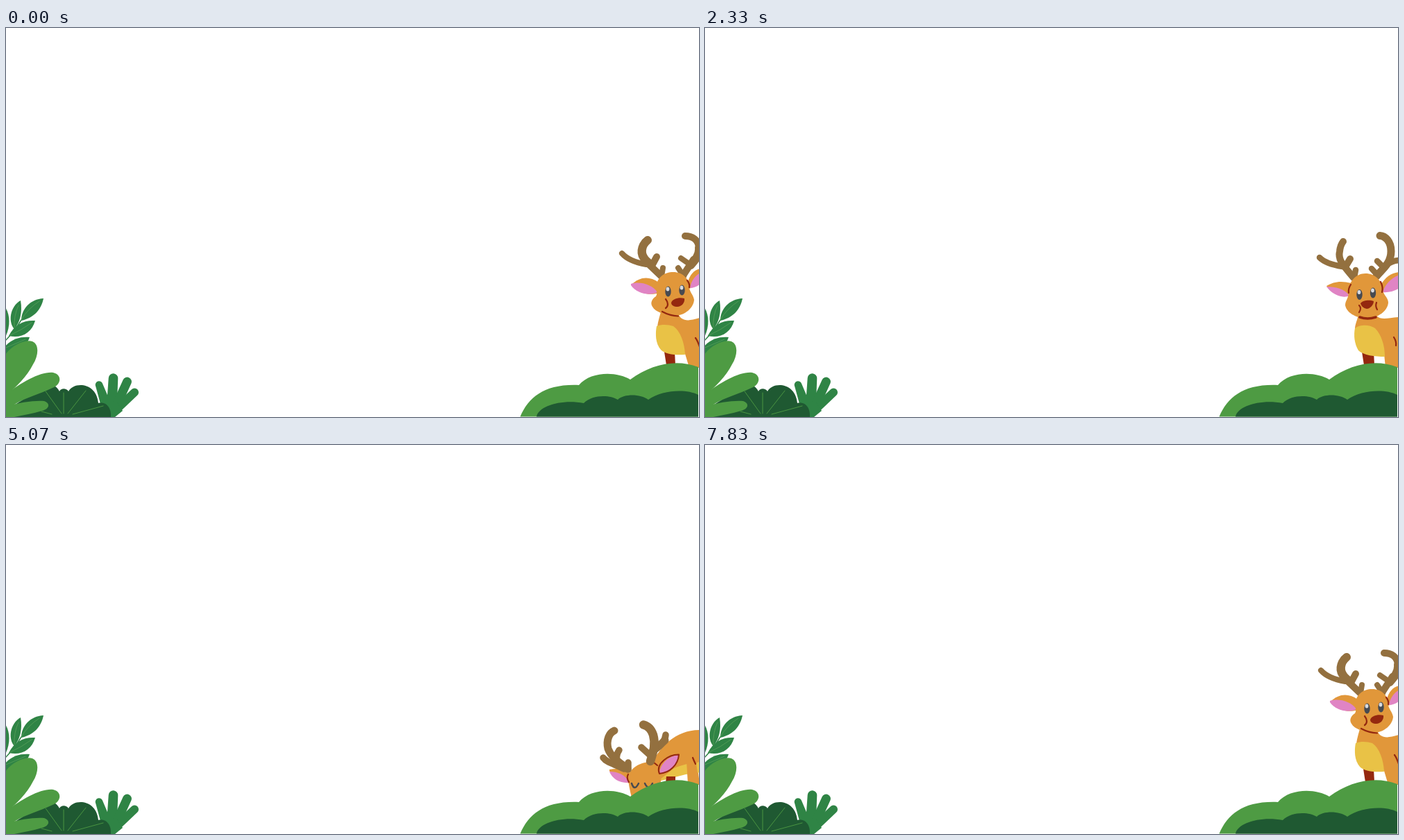
These frames come from a looping animation (998x561 px, 7.91 s). An HTML page with a canvas:

```html
<!DOCTYPE html>
<html lang="en">
<head>
<meta charset="utf-8">
<title>Deer in the bushes</title>
<style>
html, body { margin: 0; width: 100%; height: 100%; overflow: hidden; background: #fff; }
canvas { display: block; width: 998px; height: 561px; }
</style>
</head>
<body>
<canvas id="stage" width="998" height="561"></canvas>
<script>
const ctx = document.getElementById('stage').getContext('2d');
const LIGHT = '#4e9b43', MID = '#2f8445', DARK = '#1f5932';
const ORANGE = '#e1973a', YELLOW = '#e9c246', BROWN = '#93703f';
const PINK = '#e084c4', RED = '#94280f', EYE = '#474a50';

function fill(color, d) {
  ctx.fillStyle = color;
  ctx.fill(new Path2D(d));
}
function line(color, width, ...paths) {
  ctx.strokeStyle = color;
  ctx.lineWidth = width;
  ctx.lineCap = ctx.lineJoin = 'round';
  for (const d of paths) ctx.stroke(new Path2D(d));
}
function oval(color, x, y, rx, ry = rx) {
  ctx.fillStyle = color;
  ctx.beginPath();
  ctx.ellipse(x, y, rx, ry, 0, 0, Math.PI * 2);
  ctx.fill();
}
// Rounded tip tapering towards its base
function finger(x, y, r, bx, by, br) {
  const a = Math.atan2(y - by, x - bx), q = Math.PI / 2;
  ctx.fillStyle = MID;
  ctx.beginPath();
  ctx.arc(x, y, r, a - q, a + q);
  ctx.arc(bx, by, br, a + q, a - q + Math.PI * 2);
  ctx.fill();
}
function eye(x, y) {
  oval(EYE, x, y, 4.2, 7.6);
  oval('#d9dade', x - 0.5, y - 3.5, 2.4, 3);
}

function leftPlants() {
  line(MID, 1.5, 'M-2 452Q12 438 22 421');
  fill(MID, 'M22 422C22 405 35 391 54 390C51 405 41 418 22 422Z');
  fill(MID, 'M12 434C3 425 5 402 21 393C24 410 20 425 12 434Z');
  fill(MID, 'M4 444C12 428 25 421 42 422C37 440 22 448 4 444Z');
  fill(MID, 'M-4 462C8 448 20 445 34 446C30 460 15 466 -2 464Z');
  fill(MID, 'M-3 450V400C6 411 8 430 -3 450Z');
  fill(MID, 'M0 464H14V470L0 480Z');
  line('#58a05a', 0.8, 'M22 421Q31 405 48 394', 'M12 432Q11 415 18 400',
    'M6 443Q22 436 37 425', 'M0 461Q14 455 28 449');

  finger(134, 514.5, 5.3, 147, 552, 8);
  finger(154.5, 505, 6.8, 152, 552, 7.5);
  finger(174.5, 510, 6.4, 155, 553, 6.5);
  finger(185, 525.5, 6, 154, 555, 6);
  fill(MID, 'M136 540H160L168 552L157 561H136Z');

  fill(DARK, 'M10 561V545L40 526L68 515C72 517 75 520 77 524C79 519 87 519 90 524' +
    'C97 510 130 510 133 541C146 538 152 550 151 561Z');
  line(LIGHT, 0.9, 'M80 556L57 524', 'M83 556V526', 'M89 556L115 523', 'M96 557L140 545', 'M66 557L51 553');

  fill(LIGHT, 'M-1 471C9 457 28 449 38 452C48 456 47 472 39 485C30 503 14 519 -1 530Z');
  fill(LIGHT, 'M-1 529C22 511 50 495 68 497C81 500 80 514 67 519C48 528 28 533 12 543L-1 552Z');
  fill(LIGHT, 'M-1 546C20 540 40 537 55 538C64 541 63 549 52 552C39 556 25 558 12 561H-1Z');
}

function rightBush() {
  fill(LIGHT, 'M740.5 560.5C753 532 776 513 825 515C842 495 879 495 899 507C930 484 966 477 997 489V560.5Z');
  fill(DARK, 'M764 560.5C767 545 800 535 832 541C845 528 870 529 881 536C891 527 914 528 925 536C945 522 979 520 997 529V560.5Z');
}

function standing(neck, chest, leg, mark) {
  fill(RED, leg);
  fill(ORANGE, neck);
  fill(YELLOW, chest);
  line(RED, 2.2, mark);
}

const bodies = {
  right() {
    standing('M944 406L968 412C972 422 981 424 999 418V490H984L978 470L938 434C938 426 941 417 944 406Z',
      'M937 430C945 427 954 428 961 430C971 437 977 453 978 471C965 472 950 471 943 464C935 455 935 440 937 430Z',
      'M948 467H963L964 486H951Z', 'M993 447Q996 451 999 460');
  },
  middle() {
    standing('M941 413L967 415C974 422 984 418 999 417V490H980L978 470L936 434C936 427 940 420 941 413Z',
      'M936 433C944 427 957 428 965 433C974 442 979 458 979 474C965 474 948 472 941 465C935 455 934 443 936 433Z',
      'M946 467H963L964 486H949Z', 'M992 446Q996 452 995 458');
  },
  left() {
    standing('M939 418L962 412C970 422 985 417 999 414V490H980L977 470L936 435C937 429 939 424 939 418Z',
      'M937 434C943 429 954 430 962 436C971 446 977 460 978 474C964 474 949 473 941 466C935 457 935 443 937 434Z',
      'M946 468H962L963 486H948Z', 'M991 447Q992 455 994 459');
  },
  grazing() {
    fill(YELLOW, 'M935 470L999 455V472L979 475L940 485Z');
    fill(RED, 'M951 478H964V488H950Z');
    fill(ORANGE, 'M925 470C940 434 965 411 999 411V457C985 459 973 461 962 466L935 488Z');
    fill(ORANGE, 'M980 455H995L999 490H982Z');
    fill(YELLOW, 'M994 459L999 457V472L996 473Z');
    line(RED, 2.2, 'M989 451Q991 456 993 460');
  }
};

const heads = {
  right() {
    line(BROWN, 8, 'M887 325C894 333 905 338 922 341', 'M972 332L985 341', 'M968 346L976 358', 'M946 346L944 358');
    line(BROWN, 10, 'M937 330L930 343', 'M945 359L925 340', 'M975 357L990 334');
    line(BROWN, 12, 'M929 341C918 334 912 325 918 313Q921 308 924 306', 'M986 342C993 334 999 327 998 317');
    line(BROWN, 10, 'M998 317C997 305 988 300 978 300');
    fill(ORANGE, 'M940 367C926 357 912 359 901 370C910 384 930 386 940 382Z');
    fill(PINK, 'M900 369C912 365 930 369 938 381C928 387 908 383 900 371Z');
    fill(ORANGE, 'M982 366C985 355 992 348 1000 347V368L984 376Z');
    fill(PINK, 'M1000 353C992 357 986 366 985 375Q993 375 1000 369Z');
    fill(ORANGE, 'M937 375C936 360 948 352 961 352C974 352 984 361 984 374C984 380 990 385 991 392C990 404 978 414 964 415C950 414 935 410 931 402C927 396 931 390 936 387C938 384 937 380 937 375Z');
    line(RED, 2.2, 'M981 364Q985 369 984 374', 'M950 391C954 396 954 401 950 404', 'M945 409Q956 415 968 415.5');
    eye(953.5, 380);
    eye(973.5, 378);
    fill(RED, 'M958 396C960 390 970 388 977 390C978 397 972 402 967 402C962 402 958 400 958 396Z');
  },
  middle() {
    line(BROWN, 8.5, 'M885 331C892 338 905 342 918 344', 'M982 341Q991 335 1001 335', 'M968 336L978 346', 'M960 347L969 357', 'M937 349L935 360');
    line(BROWN, 10, 'M929 333L923 343', 'M934 360C920 343 911 335 914 322Q915 313 919 308');
    line(BROWN, 11, 'M967 358C975 348 988 340 988 322C988 308 980 300 972 299.5');
    fill(ORANGE, 'M931 368C915 364 905 366 895 372C905 385 918 389 928 386Z');
    fill(PINK, 'M895 373C908 373 921 376 928 386C918 391 903 384 895 373Z');
    fill(ORANGE, 'M973 371C980 358 990 353 1000 352V374L975 382Z');
    fill(PINK, 'M976 381C980 368 990 360 1000 356V375Q989 382 976 381Z');
    fill(ORANGE, 'M927 380C927 365 938 354 951 354C965 354 975 364 976 378C977 385 984 389 984 396C983 408 970 418 953 419C936 418 924 410 922 400C922 393 927 390 927 380Z');
    line(RED, 2.2, 'M930 370Q926 376 927 382', 'M973 366Q977 374 975 381', 'M942 400Q946 404 942 410', 'M967 396Q965 401 968 406');
    line(RED, 3.5, 'M943 417Q954 421 966 417');
    eye(942.5, 384.5);
    eye(962, 382);
    fill(RED, 'M944 397C948 392 958 392 963 394C963 400 957 405 953 405C948 404 945 401 944 397Z');
  },
  left() {
    line(BROWN, 9, 'M882 336C889 344 898 347 912 347', 'M974 345C984 343 993 338 1001 336', 'M918 336L912 347');
    line(BROWN, 7.5, 'M958 339L968 347', 'M953 353L961 361', 'M930 351L929 363');
    line(BROWN, 9, 'M929 364C912 351 902 341 906 322Q908 314 912 310');
    line(BROWN, 10, 'M957 365C968 352 982 345 980 325C979 312 973 305 966 303');
    fill(ORANGE, 'M925 374C910 369 900 371 891 377C902 391 914 392 921 389Z');
    fill(PINK, 'M891 377C903 377 915 380 921 388C912 394 898 388 891 377Z');
    fill(ORANGE, 'M964 370C974 358 985 357 994 360C990 375 978 382 967 384Z');
    fill(PINK, 'M968 384C972 372 982 364 995 361C990 374 980 383 968 384Z');
    fill(ORANGE, 'M919 385C919 370 930 360 942 360C955 360 966 368 968 382C969 388 975 392 976 400C975 413 960 422 943 423C927 421 916 413 915 404C916 396 919 394 919 385Z');
    line(RED, 2.2, 'M922 375Q919 381 920 386', 'M932 406Q934 410 931 415', 'M957 399C954 404 956 409 959 411', 'M942 422Q953 421 961 416');
    eye(932.5, 389);
    eye(953.5, 386);
    fill(RED, 'M932 401C937 396 945 396 951 399C950 405 944 410 941 410C936 408 934 405 932 401Z');
  },
  grazing() {
    fill(ORANGE, 'M869 468C880 466 890 467 899 473V488C885 486 875 480 869 470Z');
    fill(PINK, 'M869 471C880 471 893 475 897 487C885 488 873 482 869 471Z');
    fill(ORANGE, 'M896 478C900 464 915 457 930 457C942 460 945 472 943 485L940 512C939 530 905 530 902 512Q896 490 896 478Z');
    line(RED, 2.2, 'M896 475Q893 480 897 486', 'M933 458L938 462');
    line(EYE, 2.5, 'M901 488Q905 500 911 488', 'M920 488Q925 499 931 488');
    fill(RED, 'M909 511Q917 506 925 511Q922 520 917 520Q911 518 909 511Z');
    fill(PINK, 'M941 474C942 459 955 448 969 447C967 461 956 473 941 474Z');
    line(RED, 2, 'M941 474C935 459 955 446 969 446.5C968 461 956 473 941 474Z');
    line(BROWN, 9.5, 'M860 451C865 458 876 460 890 467', 'M883 440Q878 447 880 457', 'M896 458L896 468', 'M950 418Q949 430 934 440', 'M915 436L926 446');
    line(BROWN, 11, 'M895 467C887 460 872 452 867 438C864 425 869 415 876 412', 'M949 426L931 442');
    line(BROWN, 12.5, 'M928 456C932 443 936 432 932 418Q928 406 918 403.5');
  }
};

// start time, pose, head shift x, y, head tilt in degrees
const steps = [
  [0, 'right', 0, 0, 0],
  [130, 'middle', 0, 0, 0],
  [230, 'left', 0, 0, 0],
  [330, 'left', -2, 5, -1],
  [430, 'left', -9, 24, -4],
  [655, 'grazing', 6, -29, 3],
  [755, 'grazing', 3, -16, 2],
  [870, 'grazing', 0, 0, 0],
  [1760, 'grazing', 1, -9, 1],
  [1860, 'grazing', 6, -29, 3],
  [2000, 'left', -7, 18, -3],
  [2100, 'left', -2, 5, -1],
  [2200, 'left', 0, 0, 0],
  [2330, 'middle', 0, 0, 0],
  [2430, 'right', 0, 0, 0]
];
const LOOP = 7910, HALF = 3970;

function deer(t) {
  const u = t < HALF ? t : t - HALF;
  const [, pose, dx, dy, tilt] = steps.filter(s => s[0] <= u).pop();
  bodies[pose]();
  ctx.save();
  ctx.translate(945 + dx, 415 + dy);
  ctx.rotate(tilt * Math.PI / 180);
  ctx.translate(-945, -415);
  heads[pose]();
  ctx.restore();
}

const start = performance.now();
function draw(now) {
  const t = Math.max(0, now - start) % LOOP;
  ctx.fillStyle = '#fff';
  ctx.fillRect(0, 0, 998, 561);
  deer(t);
  rightBush();
  leftPlants();
  requestAnimationFrame(draw);
}
draw(start);
</script>
</body>
</html>
```
